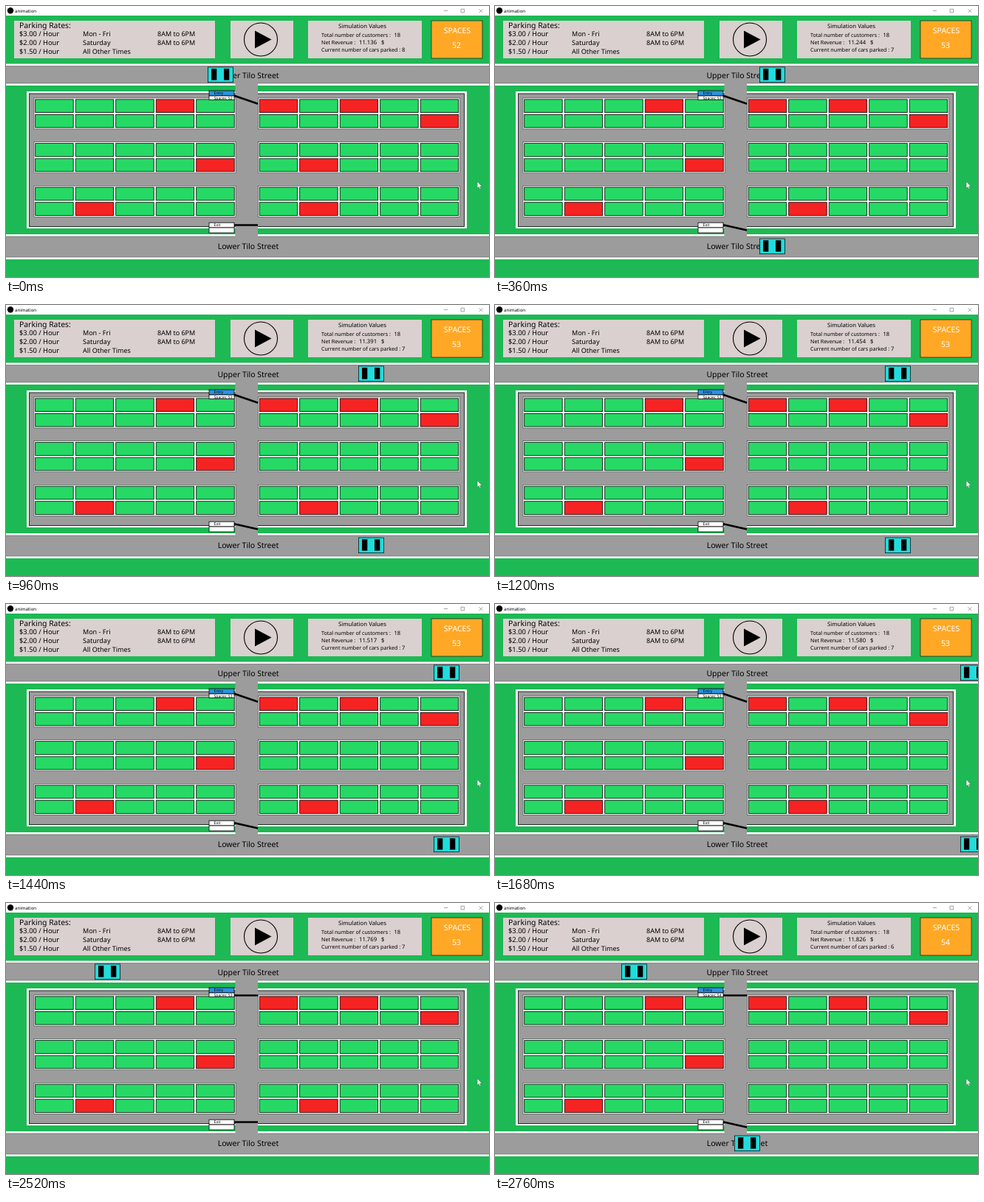
An HTML page for the animation above (2880 ms loop, 654 by 368 pixels).

```html
<!DOCTYPE html>
<html lang="en">
<head>
<meta charset="utf-8">
<title>animation</title>
<style>
  html, body { margin: 0; width: 100%; height: 100%; overflow: hidden; background: #1db954; }
  svg { display: block; width: 654px; height: 368px; }
  text { font-family: "Noto Sans", "Open Sans", sans-serif; text-rendering: geometricPrecision; }
</style>
</head>
<body>
<svg id="stage" viewBox="0 0 654 368" xmlns="http://www.w3.org/2000/svg"></svg>
<script>
const GREEN = '#1db954', ROAD = '#9c9c9c', PANEL = '#d9d0cf', FREE = '#26d965', TAKEN = '#f62323';
const NS = 'http://www.w3.org/2000/svg';
const stage = document.getElementById('stage');

function add(tag, attrs, parent = stage) {
  const el = document.createElementNS(NS, tag);
  for (const key in attrs) el.setAttribute(key, attrs[key]);
  return parent.appendChild(el);
}

// Rectangle given by its edges.
function box(x1, y1, x2, y2, fill, stroke = 0, parent = stage) {
  return add('rect', {
    x: x1, y: y1, width: x2 - x1, height: y2 - y1, fill,
    stroke: stroke ? '#000' : 'none', 'stroke-width': stroke
  }, parent);
}

function label(x, y, size, str, opts = {}) {
  const el = add('text', { x, y, 'font-size': size, fill: '#000', ...opts });
  el.textContent = str;
  return el;
}

const line = (d, width, color = '#000') =>
  add('path', { d, fill: 'none', stroke: color, 'stroke-width': width });

const mid = { 'text-anchor': 'middle' };

// Window title bar
box(0, 0, 654, 368, GREEN);
box(0, 0, 654, 13, '#fff');
add('circle', { cx: 6, cy: 6.3, r: 4.2, fill: '#000' });
label(12, 8.8, 6.1, 'animation', { 'font-family': 'Open Sans, sans-serif' });
line('M593 6.5h5M616 4.2h4.6v4.6h-4.6zM640.5 4.2l5 5m0-5l-5 5', 0.6, '#666');

// Rates
box(11, 20, 283, 71, PANEL);
label(18, 30, 10.4, 'Parking Rates:');
[['$3.00 / Hour', 'Mon - Fri', '8AM to 6PM'],
 ['$2.00 / Hour', 'Saturday', '8AM to 6PM'],
 ['$1.50 / Hour', 'All Other Times', '']].forEach((row, i) => {
  row.forEach((str, j) => label([18, 104, 205][j], 40.5 + 12 * i, j ? 9 : 9.3, str));
});

// Play button
box(304, 20, 389, 71, PANEL);
add('circle', { cx: 345, cy: 45.5, r: 22.5, fill: PANEL, stroke: '#000', 'stroke-width': 1.1 });
add('path', { d: 'M337 33.5V57.5L359.5 45.5Z' });

// Simulation values
box(409, 20, 563, 71, PANEL);
label(482.5, 30, 7.8, 'Simulation Values', mid);
label(427, 42.2, 7.1, 'Total number of customers :');
label(525.5, 42.2, 7.5, '18');
label(427, 52.2, 7.1, 'Net Revenue :');
const revenue = label(478, 52.2, 7.7, '');
label(508, 52.2, 7.5, '$');
label(427, 62.4, 7.1, 'Current number of cars parked :');
const parkedText = label(536, 62.4, 7.5, '');

// Free space counter
box(576, 20, 645, 71, '#ffa826', 0.6);
label(611, 37, 10.5, 'SPACES', { ...mid, fill: '#fff' });
const spacesText = label(610, 57.3, 10.5, '', { ...mid, fill: '#fff' });

// Streets
function street(top, bottom) {
  box(0, top - 3, 654, bottom + 3, '#fff');
  box(0, top, 654, bottom, ROAD);
  line(`M0 ${top}H654M0 ${bottom}H654`, 0.5, '#444');
}
street(81.5, 105);
street(313, 341);

// Parking lot
box(28, 116, 624, 302, '#fff');
box(31.5, 119, 620.5, 299.5, ROAD, 0.8);
box(310.5, 104, 341, 127, ROAD);
box(310.5, 295, 341, 314, ROAD);

const stalls = {};
[38, 341.5].forEach((left, side) => {
  [125, 184.7, 244.3].forEach((top, block) => {
    box(left, top, left + 273, top + 42, '#fff', 0.4);
    for (let i = 0; i < 10; i++) {
      const row = i / 5 | 0, col = i % 5;
      const x = left + 1.7 + 54.5 * col, y = top + 1.9 + 20.5 * row;
      stalls[[side, block, row, col].join('')] = box(x, y, x + 51.5, y + 17.7, FREE, 0.8);
    }
  });
});
['0003', '0114', '0211', '1000', '1002', '1014'].forEach(id => stalls[id].setAttribute('fill', TAKEN));

// Gates
box(275, 115, 309, 122, '#2c93df', 0.8);
box(275, 122, 309, 127.5, '#fff', 0.8);
label(281.5, 120.3, 5.2, 'Entry');
const gateText = label(281.5, 126.9, 5.1, '');
box(275, 294.2, 309, 301, '#fff', 0.8);
box(275, 301, 309, 308, '#fff', 0.8);
label(281.5, 299.4, 5.2, 'Exit');
const entryGate = line('', 2.5), exitGate = line('', 2.5);

label(328, 98.2, 10.5, 'Upper Tilo Street', mid);
label(328, 330.2, 10.5, 'Lower Tilo Street', mid);

function makeCar(y) {
  const car = add('g', {});
  box(0.5, y, 34.5, y + 20.7, '#20dcdc', 0.7, car);
  box(5, y + 2.2, 12.3, y + 17.6, '#000', 0, car);
  box(22, y + 2.2, 29.3, y + 17.6, '#000', 0, car);
  return car;
}
const northCar = makeCar(83), southCar = makeCar(316);

add('path', {
  d: 'M638.2 238.5v8.7l2-1.8 1.4 3 1.3-.6-1.4-2.9h2.7z',
  fill: '#fff', stroke: '#333', 'stroke-width': 0.3
});

// Simulation ticks reached at each 120 ms step
const TICKS = [0, 2, 3, 5, 6, 8, 9, 11, 12, 14, 15, 17, 18, 20, 21, 22, 23, 24, 26, 27, 29, 30, 32, 33];
const STEP = 120, SPEED = 17, WRAP = 23, LEAVE = [2, 32];

function place(car, x) {
  car.setAttribute('visibility', x === null ? 'hidden' : 'visible');
  if (x !== null) car.setAttribute('transform', `translate(${x} 0)`);
}

function render(tick) {
  const gone = LEAVE.filter(t => tick >= t).length;
  const parked = 8 - gone, spaces = 60 - parked;

  // Every parked car earns 0.003 per tick.
  let earned = 11136 + 24 * tick;
  LEAVE.forEach(t => { earned -= 3 * Math.max(0, tick - t + 1); });
  revenue.textContent = (earned / 1000).toFixed(3);
  parkedText.textContent = parked;
  spacesText.textContent = spaces;
  gateText.textContent = 'Spaces: ' + spaces;
  stalls['1111'].setAttribute('fill', gone > 0 ? FREE : TAKEN);
  stalls['1211'].setAttribute('fill', gone > 1 ? FREE : TAKEN);

  place(northCar, tick < WRAP ? 273 + SPEED * tick : 1 + SPEED * (tick - WRAP));
  const since = tick - (gone > 1 ? LEAVE[1] : LEAVE[0]);
  const exitX = 307 + SPEED * since;
  const leaving = since >= 0 && exitX < 654;
  place(southCar, leaving ? exitX : null);

  entryGate.setAttribute('d', tick < WRAP ? 'M309 121.8L341 132.7' : 'M309 125.5H341');
  exitGate.setAttribute('d', leaving ? 'M309 297.3L341 304.5' : 'M309 297.5H341');
}

let shown = -1;
const start = performance.now();
function loop(now) {
  const step = Math.floor(Math.max(0, now - start) / STEP) % TICKS.length;
  if (step !== shown) render(TICKS[shown = step]);
  requestAnimationFrame(loop);
}
loop(start);
</script>
</body>
</html>
```
